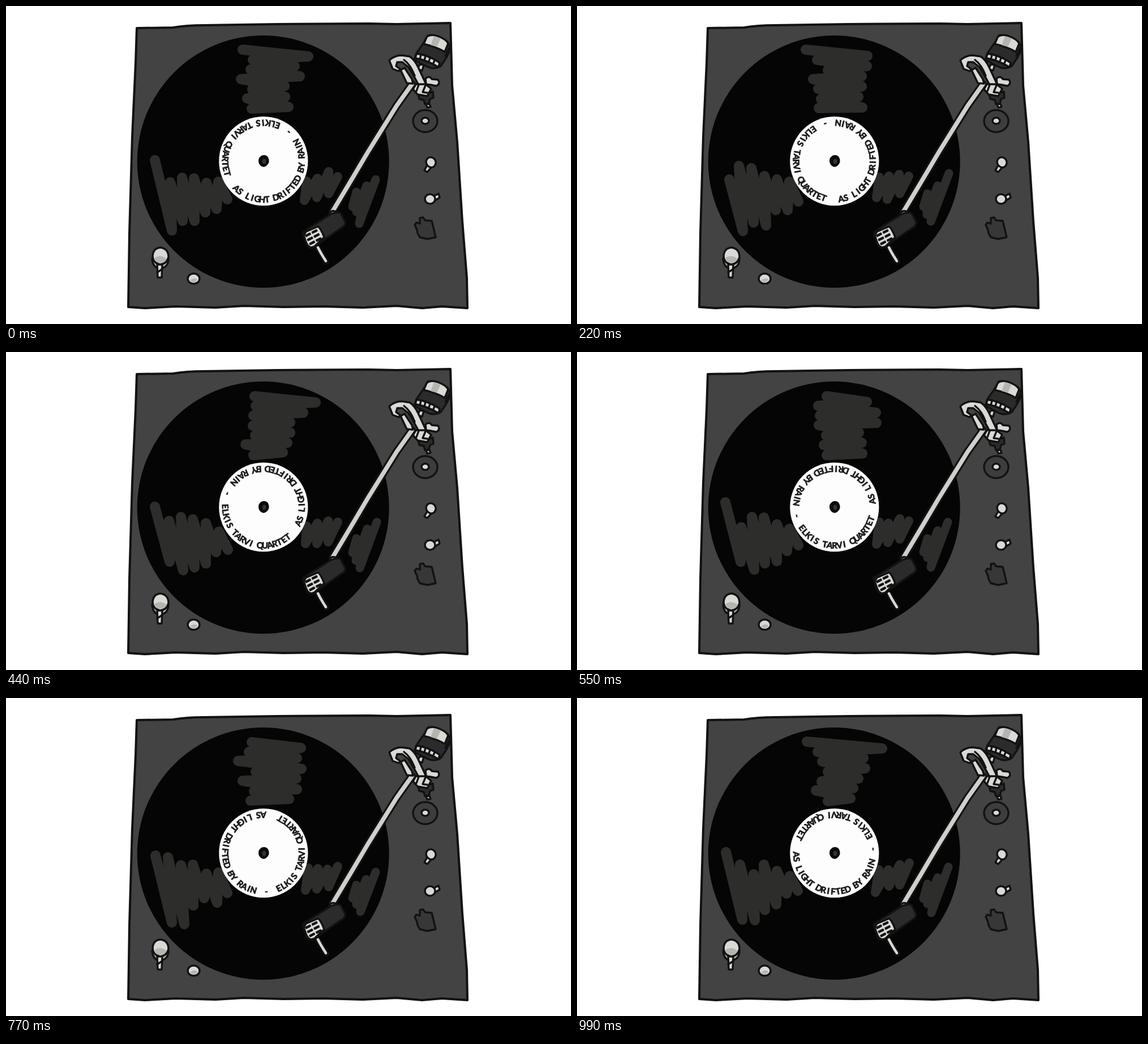
Write an HTML page that moves like this. It is 998x561 px and loops after 1.1 s.

```html
<!DOCTYPE html>
<html lang="en">
<head>
<meta charset="utf-8">
<title>Turntable</title>
<style>
  html, body { margin: 0; width: 100%; height: 100%; overflow: hidden; background: #fff; }
  svg { display: block; width: 100vw; height: 100vh; }
  .ink { stroke: #121212; stroke-width: 3.4; stroke-linejoin: round; stroke-linecap: round; }
  .line { fill: none; stroke-linecap: round; stroke-linejoin: round; }
  .light { fill: #d9d9d6; }
  .shade { fill: #b4b4b1; }
  .dark { fill: #2b2b2b; }
  #shine polyline { fill: none; stroke: #2d2d2b; stroke-linecap: round; stroke-linejoin: round; }
  #words text { font: bold 15px Lato, "Open Sans", sans-serif; text-anchor: middle; fill: #1c1c1c; stroke: #1c1c1c; stroke-width: .8; stroke-linejoin: round; }
</style>
</head>
<body>
<svg viewBox="0 0 998 561">
  <path class="ink" style="stroke-width:4" fill="#434343" d="M231,39 L295,38 Q320,34 348,34 L480,32 640,31 690,32 785,30 L788,140 797,240 806,380 814,480 815,533 L770,530 735,533 690,529 630,532 560,530 490,531 420,529 370,532 300,530 245,533 216,531 L218,400 223,230 229,100Z"/>
  <circle cx="454.2" cy="274.5" r="222.5" fill="#050505"/>
  <g id="shine"></g>
  <circle cx="454.8" cy="273.7" r="78.6" fill="#fdfdfd"/>
  <g id="words"></g>
  <path fill="#0a0a0a" d="M451,264 Q459,261 463,267 Q467,275 461,281 Q455,287 449,281 Q444,275 447,268Z"/>
  <ellipse cx="456" cy="274" rx="3.5" ry="4.5" fill="#333"/>

  <!-- arm -->
  <g class="line">
    <path stroke="#121212" stroke-width="14" d="M717,138 L690,176 639,258 607,312 577,362"/>
    <path stroke="#cfcfcc" stroke-width="7.5" d="M717,138 L690,176 639,258 607,312 577,362"/>
  </g>

  <!-- head -->
  <path class="ink light" d="M571,366 Q576,359 583,363 L584,370 573,373Z"/>
  <path class="ink dark" d="M528,396 L574,367 Q589,361 592,367 L599,381 Q600,387 593,391 L545,424 Q536,430 531,421 L525,405 Q523,399 528,396Z"/>
  <path class="ink light" d="M530,398 L551,389 Q556,392 562,408 L545,424 Q536,429 531,419 L526,405Z"/>
  <g id="grille" transform="translate(543 408) rotate(-27)" fill="#121212"></g>
  <g class="line">
    <path stroke="#121212" stroke-width="10" d="M551,427 L566,451"/>
    <path stroke="#d9d9d6" stroke-width="4.5" d="M551,426 Q556,436 565,450"/>
  </g>

  <!-- weight -->
  <path class="ink dark" d="M745,52 Q760,48 780,63 L786,75 778,91 768,106 Q756,113 744,107 L721,95 725,83 737,66Z"/>
  <path class="ink light" d="M743,55 Q750,49 762,53 Q777,58 781,66 L775,81 Q758,71 738,67Z"/>
  <path class="shade" d="M756,53 L768,57 761,72 750,69Z"/>
  <path class="ink light" d="M725,84 Q745,86 766,100 L764,108 Q745,96 723,92Z"/>
  <path class="ink line" d="M733,86 L731,94 M741,88 L739,96 M749,92 L746,100 M757,96 L754,103 M776,88 L783,74"/>
  <path class="ink light" d="M731,103 L738,104 735,114 727,111Z"/>

  <!-- pivot -->
  <path class="ink dark" d="M728,156 L754,151 755,162 749,164 747,172 740,173 738,166 730,164Z"/>
  <path class="ink light" d="M742,173 L748,173 750,178 744,179Z"/>
  <path class="ink light" d="M741,128 Q748,122 752,129 L763,130 Q768,137 760,141 L750,139 742,138Z"/>
  <path class="ink light" d="M697,113 L704,109 717,129 719,137 708,136Z"/>
  <path class="ink light" d="M677,96 Q686,87 699,87 L713,89 Q722,95 728,108 L742,138 731,143 Q722,126 711,108 L700,99 691,99 689,106 696,111 694,115 683,111Z"/>
  <path class="ink light" d="M724,138 L741,138 751,146 744,159 727,156 719,147Z"/>
  <path class="ink line" d="M703,95 Q715,104 722,123 M729,139 L725,150 M741,140 L736,152 744,153"/>

  <!-- controls -->
  <g class="ink">
    <ellipse cx="740.5" cy="203" rx="21.5" ry="19.5" fill="#3d3d3d"/>
    <ellipse class="light" cx="740.5" cy="202.5" rx="6.5" ry="5.5"/>
    <path class="light" d="M744,281 L739,290 744,293 751,285Z"/>
    <path class="light" d="M742,274 Q744,266 752,267 Q760,270 759,278 Q756,287 748,284 Q742,281 742,274Z"/>
    <path class="light" d="M754,336 L764,331 766,338 756,344Z"/>
    <ellipse class="light" cx="749" cy="340.5" rx="9" ry="8.5"/>
    <path fill="#373737" d="M731,374 L737,373 740,378 752,379 755,391 759,408 744,411 731,408 727,401 726,395 722,386 725,382 731,384Z"/>
    <path class="shade" d="M258,446 Q260,463 272,463 Q287,462 287,445Z"/>
    <path class="light" d="M267,456 L276,456 275,479 268,479Z"/>
    <path class="light" d="M259,441 Q260,427 273,426 Q287,428 287,443 Q284,455 272,456 Q259,453 259,441Z"/>
    <path fill="none" d="M267,470 L276,464"/>
    <ellipse class="light" cx="331.5" cy="481" rx="10.5" ry="9"/>
  </g>
  <path class="shade" d="M262,445 Q272,437 284,446 Q281,453 272,453 Q264,452 262,445Z M325,484 Q332,478 338,482 Q336,488 330,487Z"/>
</svg>
<script>
const NS = 'http://www.w3.org/2000/svg';
const STEP = 110, COUNT = 10;
const shine = document.getElementById('shine');
const words = document.getElementById('words');
const grille = document.getElementById('grille');

function add(parent, tag, attrs) {
  const el = document.createElementNS(NS, tag);
  for (const key in attrs) el.setAttribute(key, attrs[key]);
  return parent.appendChild(el);
}

const mix = (a, b, t) => a.map((v, i) => v + (b[i] - v) * t);

function random(seed) {
  const n = Math.sin(seed * 12.9898 + 4.1) * 43758.5453;
  return n - Math.floor(n);
}

// Lettering runs counter-clockwise around the label.
const LETTER = 7.4, SPACE = 6;
let offset = 0;
[...'AS LIGHT DRIFTED BY RAIN  -  ELKIS TARVI QUARTET'].forEach((letter, i) => {
  if (letter === ' ') {
    offset += SPACE;
    return;
  }
  const tilt = 5 * Math.sin(i * 2.3);
  add(words, 'text', { y: 5.5, transform: `rotate(${-offset - 90}) translate(0 67.5) rotate(${tilt})` })
    .textContent = letter;
  offset += LETTER;
});

for (let row = -1; row <= 1; row++)
  for (const x of [-12, 1]) add(grille, 'rect', { x, y: row * 8 - 2.5, width: 11, height: 4.5, rx: 1.5 });

// Each reflection is a zigzag between two edges, redrawn by hand at every step.
const patches = [
  { from: [[402, 77], [422, 180]], to: [[552, 80], [502, 188]], turns: 13, slack: .28, width: 18 },
  { from: [[262, 264], [386, 312]], to: [[286, 418], [392, 350]], turns: 12, slack: .3, width: 18 },
  { from: [[535, 298], [588, 288]], to: [[516, 346], [578, 342]], turns: 7, slack: .25, width: 16 },
  { from: [[657, 295], [610, 335]], to: [[627, 392], [612, 355]], turns: 6, slack: .15, width: 15 }
];
for (const patch of patches) patch.line = add(shine, 'polyline', { 'stroke-width': patch.width });

function scribble({ from, to, turns, slack }, seed) {
  return Array.from({ length: turns }, (_, i) => {
    const t = i / (turns - 1);
    const ends = [mix(...from, t), mix(...to, t)];
    if (i % 2) ends.reverse();
    return mix(...ends, slack * random(seed + i)).map(Math.round);
  }).join(' ');
}

// The record turns slowly at first, then picks up speed.
function angleAt(step) {
  const u = step / COUNT;
  return 135 - 360 * u + 36 * Math.sin(Math.PI * u) ** 1.4;
}

let shown = -1;

function draw(ms) {
  const step = Math.floor(ms / STEP) % COUNT;
  if (step === shown) return;
  shown = step;
  words.setAttribute('transform', `translate(454.8 273.7) rotate(${angleAt(step)})`);
  patches.forEach((patch, i) => patch.line.setAttribute('points', scribble(patch, step * 97 + i * 23)));
}

const begin = performance.now();
function tick() {
  draw(performance.now() - begin);
  requestAnimationFrame(tick);
}
tick();
</script>
</body>
</html>
```
